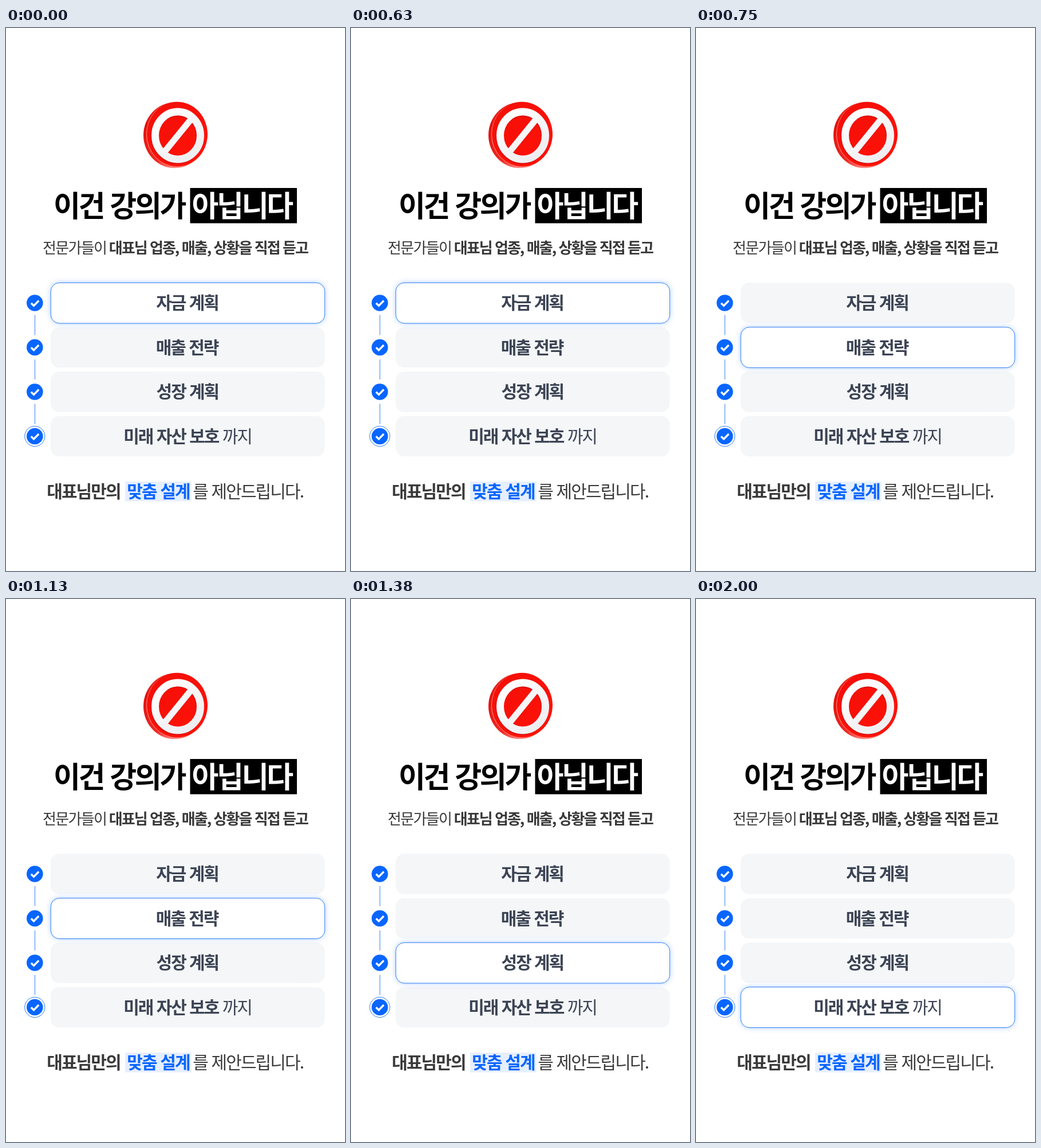
These frames come from a looping animation (592x947 px, 2830 ms). An HTML page:

```html
<!DOCTYPE html>
<html lang="ko">
<head>
<meta charset="utf-8">
<style>
  html, body { margin: 0; width: 100%; height: 100%; overflow: hidden; background: #fff; }
  svg { display: block; width: 592px; height: 947px; }
  text { font-family: "Noto Sans CJK KR", "Noto Sans CJK", sans-serif; font-weight: 400; white-space: pre; }
  .b { font-weight: 700; }
  .title { font-size: 51px; letter-spacing: -3.3px; }
  .sub { font-size: 26px; letter-spacing: -1.95px; fill: #383838; }
  .row { font-size: 30px; letter-spacing: -2.05px; fill: #3c4454; }
  .end { font-size: 30px; letter-spacing: -1.9px; fill: #3a3a3a; }
</style>
</head>
<body>
<svg viewBox="0 0 592 947">
  <defs>
    <linearGradient id="rim" x1="0" y1="0" x2=".5" y2="1">
      <stop offset="0" stop-color="#f04a42"/>
      <stop offset=".3" stop-color="#e3100b"/>
      <stop offset=".8" stop-color="#ee2a24"/>
      <stop offset="1" stop-color="#ff8a84"/>
    </linearGradient>
    <linearGradient id="face" x1="0" y1="0" x2=".8" y2="1">
      <stop offset="0" stop-color="#f20f08"/>
      <stop offset="1" stop-color="#ff1208"/>
    </linearGradient>
    <linearGradient id="edge" x1="0" y1=".6" x2=".5" y2=".4">
      <stop offset="0" stop-color="#ff9a94"/>
      <stop offset="1" stop-color="#ff9a94" stop-opacity="0"/>
    </linearGradient>
    <linearGradient id="white" gradientUnits="userSpaceOnUse" x1="265" y1="145" x2="330" y2="235">
      <stop offset="0" stop-color="#fff"/>
      <stop offset="1" stop-color="#ececf0"/>
    </linearGradient>
    <filter id="glow" x="-10%" y="-40%" width="120%" height="180%">
      <feDropShadow dx="0" dy="0" stdDeviation="5" flood-color="#0066ff" flood-opacity=".3"/>
    </filter>
    <g id="ban" fill="none">
      <ellipse cx="300" cy="187.5" rx="39.5" ry="41.5" stroke-width="13"/>
      <path d="M276 217L324 158" stroke-width="11"/>
    </g>
    <g id="check">
      <circle r="14.3" fill="#0866ff"/>
      <path d="M-6.5 .3L-1.8 4.9L6.9 -4" fill="none" stroke="#fff" stroke-width="3.4"/>
    </g>
  </defs>

  <ellipse cx="294.5" cy="187" rx="54.5" ry="57.3" fill="url(#rim)"/>
  <ellipse cx="298.7" cy="185.3" rx="53.3" ry="56.5" fill="url(#face)" stroke="url(#edge)"/>
  <use href="#ban" x="-1" y="1.5" stroke="#d30d0a"/>
  <use href="#ban" stroke="url(#white)"/>

  <rect x="321.5" y="279" width="186.5" height="61.5"/>
  <text class="title b" x="83" y="329">이건 강의가</text>
  <text class="title b" x="324.5" y="329" fill="#fff">아닙니다</text>

  <text class="sub" x="64" y="393" style="letter-spacing:-1.65px">전문가들이</text>
  <text class="sub b" x="179.7" y="393">대표님 업종, 매출, 상황을 직접 듣고</text>

  <g id="rows"></g>
  <rect id="active" x="78.2" y="444.3" width="478.5" height="70.7" rx="15" fill="#fff"
        stroke="#2f7df2" filter="url(#glow)"/>
  <g id="labels"></g>
  <text class="row" x="377.8" y="722.8">까지</text>
  <circle cx="50.3" cy="712" r="17.6" fill="none" stroke="#2f7df2"/>

  <rect x="208" y="791" width="115.5" height="34.5" fill="#e6effe"/>
  <text class="end b" x="71.2" y="819">대표님만의</text>
  <text class="end b" x="211.3" y="819" style="fill:#0866ff">맞춤 설계</text>
  <text class="end" x="326.3" y="819">를 제안드립니다.</text>
</svg>
<script>
  const STEP = 77.5, LOOP = 2830, SWITCHES = [750, 1380, 2000];
  const labels = [['자금 계획', 262.2], ['매출 전략', 261.8], ['성장 계획', 262.6], ['미래 자산 보호', 205.3]];
  const $ = id => document.getElementById(id);

  labels.forEach(([label, x], i) => {
    const dy = i * STEP;
    $('rows').innerHTML += `
      <rect x="78" y="${444.2 + dy}" width="478.7" height="70.6" rx="15" fill="#f4f6f8"/>
      <use href="#check" x="50.3" y="${479.5 + dy}"/>` +
      (i < 3 ? `<path d="M50.5 ${500.5 + dy}v35" stroke="#3d86f2"/>` : '');
    $('labels').innerHTML += `<text class="row b" x="${x}" y="${490.3 + dy}">${label}</text>`;
  });

  const start = performance.now();
  function draw() {
    const t = (performance.now() - start) % LOOP;
    const index = SWITCHES.filter(s => t >= s).length;
    $('active').setAttribute('transform', `translate(0 ${index * STEP})`);
    requestAnimationFrame(draw);
  }
  draw();
</script>
</body>
</html>
```
